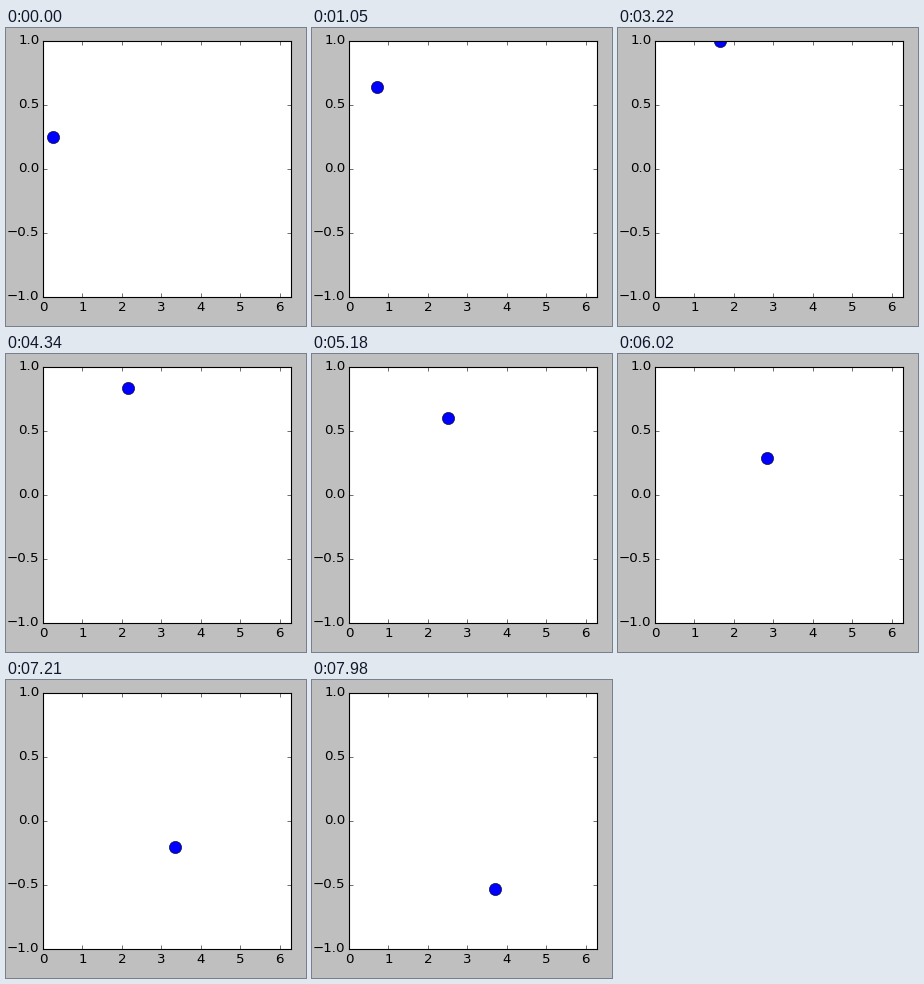
Animation, 300 px wide and 298 px high, one loop 8 s. Source, as a matplotlib script:

```python
import numpy as np
import matplotlib.pyplot as plt
from matplotlib.animation import FuncAnimation

plt.style.use("classic")
plt.rcParams.update({
    "font.family": "DejaVu Sans",
    "savefig.dpi": "figure",
    "savefig.facecolor": "0.75",
})

WIDTH, HEIGHT, DPI = 300, 298, 80
LOOP_MS, INTERVAL = 8000, 20
TICK_MS = 70                      # the dot moves only on this time grid
START, STEP, STEPS = 0.25, 0.05, 70


def step_ticks():
    """Tick at which each step begins; the pace drops slightly halfway."""
    k = np.arange(STEPS)
    pace = np.where(k < 40, 1.64 * k + 0.64, 1.67 * k - 0.2)
    last_tick = LOOP_MS // TICK_MS
    return np.minimum(np.floor(pace).astype(int), last_tick)


STEP_TICKS = step_ticks()

fig = plt.figure(figsize=(WIDTH / DPI, HEIGHT / DPI), dpi=DPI, facecolor="0.75")
ax = fig.add_axes([37 / WIDTH, 29 / HEIGHT, 248 / WIDTH, 256 / HEIGHT])
ax.set_xlim(0, 2 * np.pi)
ax.set_ylim(-1, 1)
ax.set_xticks(range(7))
ax.set_yticks(np.linspace(-1, 1, 5))
ax.tick_params(axis="y", pad=3.1)
dot, = ax.plot([], [], "bo", ms=11)


def update(frame):
    tick = (frame * INTERVAL + INTERVAL // 2) // TICK_MS
    step = np.searchsorted(STEP_TICKS, tick, side="right") - 1
    x = START + STEP * step
    dot.set_data([x], [np.sin(x)])
    return dot,


anim = FuncAnimation(fig, update, frames=LOOP_MS // INTERVAL, interval=INTERVAL,
                     init_func=lambda: update(0), repeat=True, repeat_delay=0)
plt.show()
```
